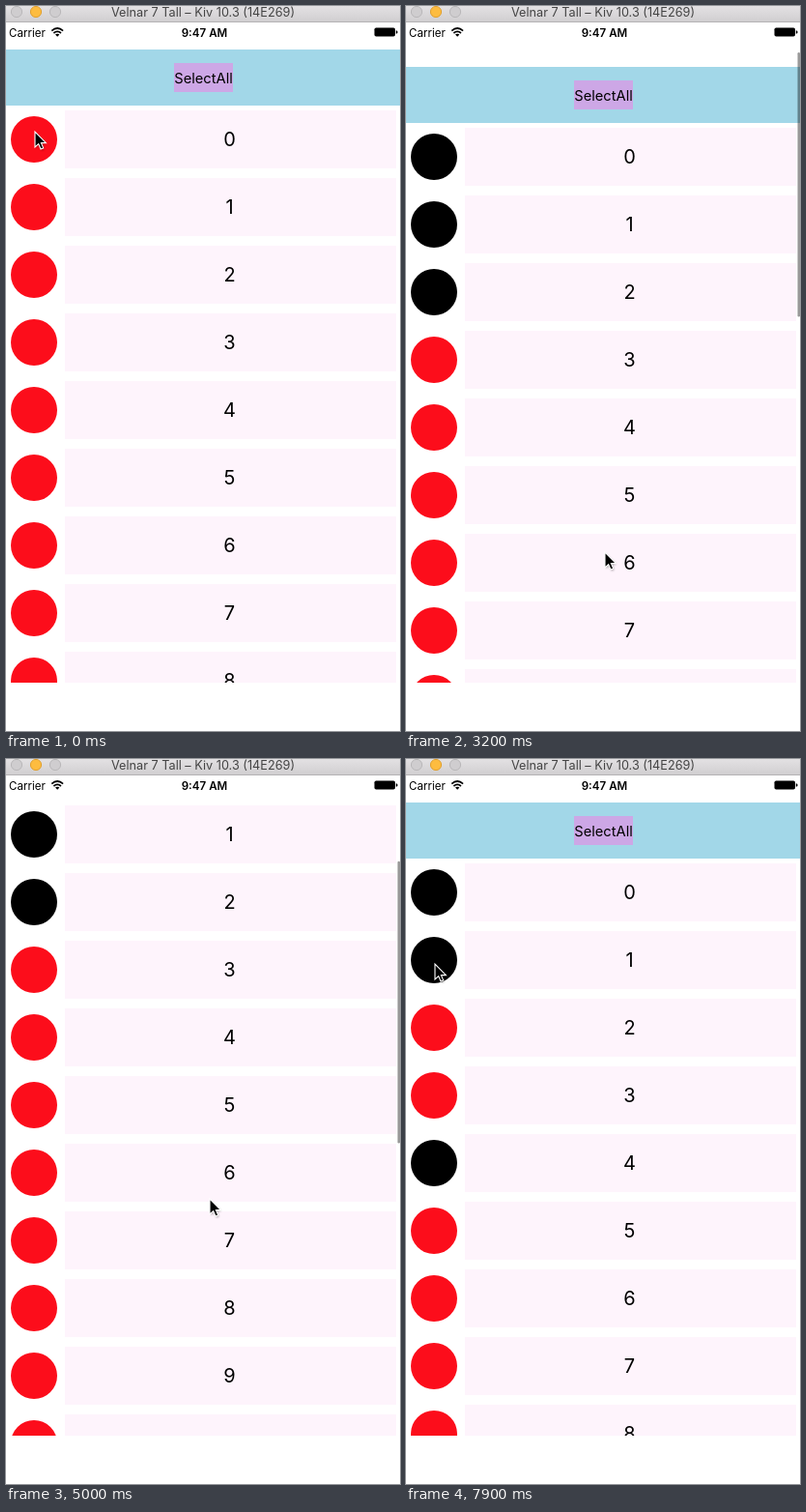
Animation, 408 px wide and 750 px high, one loop 8 s. Source, as an HTML page:

```html
<!DOCTYPE html>
<html lang="en">
<head>
<meta charset="utf-8">
<title>Select list</title>
<style>
  html, body { margin: 0; width: 100%; height: 100%; overflow: hidden; background: #fff; }
  svg { display: block; width: 408px; height: 750px; font-family: Inter, Roboto, sans-serif; }
</style>
</head>
<body>
<svg viewBox="0 0 408 750">
  <defs>
    <linearGradient id="bar" x2="0" y2="1">
      <stop offset="0" stop-color="#e3e1e3"/>
      <stop offset="1" stop-color="#d0ced0"/>
    </linearGradient>
    <clipPath id="view"><rect y="45" width="408" height="655"/></clipPath>
    <filter id="soft" x="-50%" y="-50%" width="200%" height="200%"><feGaussianBlur stdDeviation="1"/></filter>
  </defs>
  <rect width="408" height="750" fill="#fff"/>

  <g clip-path="url(#view)">
    <g id="list">
      <rect y="45" width="408" height="58" fill="#a2d7e8"/>
      <rect x="174" y="59" width="61" height="30" fill="#cda7e6"/>
      <text x="204.5" y="79.5" font-size="14.7" text-anchor="middle">SelectAll</text>
    </g>
    <rect id="thumb" x="405.5" width="2.5" rx="1.25" fill="#000"/>
  </g>

  <rect width="408" height="16.5" fill="url(#bar)"/>
  <rect y="16" width="408" height="1" fill="#b4b2b4"/>
  <g stroke-width="1">
    <circle cx="11" cy="6" r="5.6" fill="#cfcdcf" stroke="#b9b7b9"/>
    <circle cx="31" cy="6" r="5.6" fill="#fdbc40" stroke="#e0a030"/>
    <circle cx="51" cy="6" r="5.6" fill="#cfcdcf" stroke="#b9b7b9"/>
  </g>
  <text x="204" y="11" font-size="12.7" fill="#444" text-anchor="middle">Velnar 7 Tall – Kiv 10.3 (14E269)</text>

  <text x="3" y="31.7" font-size="11.6">Carrier</text>
  <g fill="none" stroke="#000" stroke-width="1.7">
    <path d="M47.3 25.6Q53.2 20.4 59.1 25.6M49.4 28Q53.2 24.7 57 28"/>
    <path d="M53.2 31.8L51 29.5Q53.2 27.9 55.4 29.5Z" fill="#000" stroke="none"/>
  </g>
  <text x="205.5" y="31.7" font-size="11.6" font-weight="600" text-anchor="middle">9:47 AM</text>
  <rect x="381.5" y="22.5" width="21.5" height="9" rx="1.8"/>
  <path d="M403.8 25.2Q405.6 25.4 405.6 27T403.8 28.8Z"/>

  <g id="cursor">
    <path d="M1 2V17L4.6 14L7 19.4L9.6 18.2L7.2 13H12Z" opacity=".35" filter="url(#soft)"/>
    <path d="M0 0V16L3.7 12.6L6 18L8.7 16.9L6.4 11.6H11.4Z" stroke="#fff" stroke-width="1.1"/>
  </g>
</svg>
<script>
const LOOP = 8000, STEP = 100;
const ROWS = 20, ROW_H = 70, FIRST = 103;
const VIEW_TOP = 45, VIEW_H = 655, CONTENT_H = 58 + ROWS * ROW_H;
const MAX_SCROLL = CONTENT_H - VIEW_H;

// row, press time, release time
const taps = [[0, 200, 400], [2, 1100, 1300], [1, 1800, 2000], [4, 5800, 6000], [2, 7300, 7500]];

// time, x, y of the pointer tip
const pointer = [
  [0, 30, 130], [400, 30, 131], [800, 41, 289], [1300, 41, 288], [1700, 36, 215],
  [2050, 36, 215], [2400, 49, 291], [2800, 200, 520], [3200, 206, 565], [3300, 207, 545],
  [3800, 213, 180], [4000, 213, 144], [4400, 213, 144], [4500, 213, 160], [4900, 216, 440],
  [5100, 206, 470], [5700, 45, 420], [6200, 45, 420], [6600, 74, 380], [7100, 38, 284],
  [7500, 37, 283], [7900, 30, 212]
];

// time, scroll offset
const scrolling = [
  [2800, 0], [3000, -10], [3200, -18], [3300, -8], [3400, 25], [3500, 80], [3600, 180],
  [3800, 470], [4000, 710], [4100, 785], [4200, 812], [4300, 805], [4400, 803], [4500, 803],
  [4600, 765], [4800, 470], [5000, 130], [5100, 30], [5200, -20], [5300, -12], [5400, -4],
  [5500, -1], [5600, 0]
];

const thumbFade = [[2850, 0], [3000, .4], [5500, .4], [5800, 0]];

const $ = id => document.getElementById(id);

function add(parent, tag, attrs) {
  const el = document.createElementNS('http://www.w3.org/2000/svg', tag);
  for (const key in attrs) el.setAttribute(key, attrs[key]);
  return parent.appendChild(el);
}

function sample(keys, t, column = 1) {
  const next = keys.findIndex(key => key[0] > t);
  if (next === 0) return keys[0][column];
  if (next < 0) return keys[keys.length - 1][column];
  const a = keys[next - 1], b = keys[next];
  return a[column] + (b[column] - a[column]) * (t - a[0]) / (b[0] - a[0]);
}

const rows = Array.from({ length: ROWS }, (_, i) => {
  const g = add($('list'), 'g', { transform: `translate(0 ${FIRST + i * ROW_H})` });
  const back = add(g, 'rect', { width: 408, height: ROW_H });
  const panel = add(g, 'rect', { x: 61, y: 5, width: 343, height: 60, fill: '#fef4fc' });
  const dot = add(g, 'circle', { cx: 29, cy: 35, r: 24 });
  add(g, 'text', { x: 231.5, y: 42.3, 'font-size': 20, 'text-anchor': 'middle' }).textContent = i;
  return { back, panel, dot };
});

function drawRow({ back, panel, dot }, i, t) {
  const own = taps.filter(tap => tap[0] === i);
  const pressed = own.some(([, down, up]) => t >= down && t < up);
  const selected = own.filter(tap => t >= tap[2]).length % 2;
  back.setAttribute('fill', pressed ? '#dcdcdc' : '#fff');
  panel.setAttribute('visibility', pressed ? 'hidden' : 'visible');
  dot.setAttribute('fill', pressed ? '#cacaca' : selected ? '#000' : '#fc0d1b');
}

function drawThumb(scroll, t) {
  const track = VIEW_H - 6;
  const full = track * VIEW_H / CONTENT_H;
  const inside = Math.min(MAX_SCROLL, Math.max(0, scroll));
  const over = scroll - inside;
  const y = VIEW_TOP + 3 + (track - full) * inside / MAX_SCROLL + Math.max(0, over);
  $('thumb').setAttribute('y', y);
  $('thumb').setAttribute('height', full - Math.abs(over));
  $('thumb').setAttribute('opacity', sample(thumbFade, t));
}

function draw(now) {
  const t = Math.floor(now % LOOP / STEP) * STEP;
  const scroll = sample(scrolling, t);
  $('list').setAttribute('transform', `translate(0 ${-scroll})`);
  rows.forEach((row, i) => drawRow(row, i, t));
  drawThumb(scroll, t);
  $('cursor').setAttribute('transform', `translate(${sample(pointer, t)} ${sample(pointer, t, 2)})`);
}

const start = performance.now();
function tick() {
  draw(performance.now() - start);
  requestAnimationFrame(tick);
}
tick();
</script>
</body>
</html>
```
